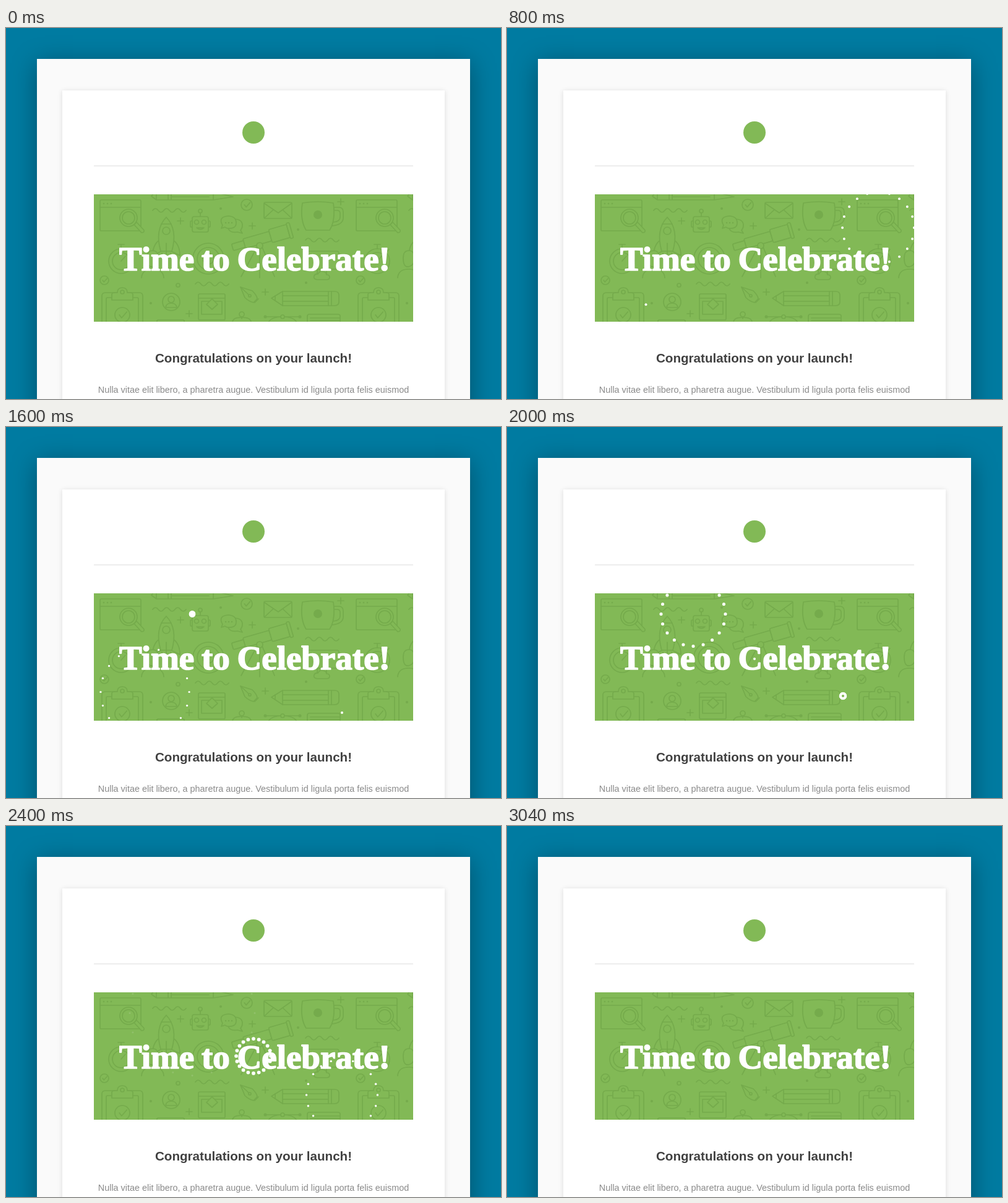
Recreate the animation shown at these times as an HTML page with a canvas. Size 800x600 px, loop 3.52 s.

```html
<!DOCTYPE html>
<html lang="en">
<head>
<meta charset="utf-8">
<title>Celebrate</title>
<style>
html, body { margin: 0; width: 100%; height: 100%; overflow: hidden; background: #007ba1; }
canvas { display: block; }
</style>
</head>
<body>
<canvas id="stage" width="800" height="600"></canvas>
<script>
const GREEN = '#82b956', INK = '#75ab4c';
const LOOP = 3520, STEP = 80;
const BURST = 980, REACH = 103, LIFT = 46, SPARKS = 20;
const TILE = 414;

const stage = document.getElementById('stage').getContext('2d');
const page = document.createElement('canvas');
page.width = 800;
page.height = 600;
const g = page.getContext('2d');

// launch = start of the climb, pop = start of the burst
const rockets = [
  { x: 600, y: 323, launch: 75, pop: 271, size: 2.4 },
  { x: 224.5, y: 428.5, launch: 660, pop: 985, size: 2.1 },
  { x: 301, y: 302.5, launch: 1199, pop: 1507, size: 3 },
  { x: 543, y: 435, launch: 1492, pop: 1874, size: 2.1 },
  { x: 400, y: 372, launch: 1740, pop: 2058, size: 3.1 }
];

function disc(c, x, y, r) {
  c.beginPath();
  c.arc(x, y, r, 0, Math.PI * 2);
  c.fill();
}

function panel(x, y, w, fill, blur, shade, drop) {
  g.save();
  g.shadowColor = shade;
  g.shadowBlur = blur;
  g.shadowOffsetY = drop;
  g.fillStyle = fill;
  g.fillRect(x, y, w, 700);
  g.restore();
}

function shape(d) {
  const p = new Path2D(d);
  g.fillStyle = GREEN;
  g.fill(p);
  g.stroke(p);
}

function ring(x, y, r) {
  g.beginPath();
  g.arc(x, y, r, 0, Math.PI * 2);
  g.fillStyle = GREEN;
  g.fill();
  g.stroke();
}

function box(x, y, w, h, r = 2) {
  g.beginPath();
  g.roundRect(x, y, w, h, r);
  g.fillStyle = GREEN;
  g.fill();
  g.stroke();
}

function dot(x, y, r = 2) {
  g.fillStyle = INK;
  disc(g, x, y, r);
}

function plus(x, y) {
  shape(`M${x - 5} ${y}h10M${x} ${y - 5}v10`);
}

function wave(x, y) {
  shape(`M${x} ${y}q4.5 -6 9 0t9 0t9 0t9 0t9 0t9 0`);
}

function tick(x, y, r) {
  ring(x, y, r);
  const k = r / 10;
  shape(`M${x - 4 * k} ${y}l${3 * k} ${4 * k}l${7 * k} ${-8 * k}`);
}

function browser() {
  box(152, 278, 66, 50);
  shape('M152 290H218');
  [158, 164, 170].forEach(x => dot(x, 284, 1.3));
  shape('M207 318l4 -4l12 13q1 4 -4 4z');
  ring(198, 307, 14);
  ring(198, 307, 10);
}

function spaceship() {
  shape('M249 342q-12 8 -12 26l14 -7M269 342q12 8 12 26l-14 -7');
  shape('M250 361Q240 326 259 306Q278 326 268 361Z');
  shape('M251 317h16M259 348v20M252 364v8M266 364v8');
  ring(259, 328, 6);
}

function robot() {
  shape('M314 299v6');
  ring(314, 296, 3);
  box(298, 312, 4, 10);
  box(326, 312, 4, 10);
  box(301, 305, 26, 25, 3);
  ring(308, 314, 3.5);
  ring(320, 314, 3.5);
  shape('M308 323q6 5 12 0z');
}

function chat() {
  shape('M368 309q14 0 14 10q0 5 -3 8l3 5l-8 -2q-12 2 -15 -6');
  shape('M348 324l2 -5q-8 -14 10 -15q12 1 12 11t-13 9q-3 0 -5 -2z');
  [355, 360, 365].forEach(x => dot(x, 315, 1.2));
}

function envelope() {
  box(417, 282, 45, 26);
  shape('M418 284l22 15l21 -15M418 307l14 -13M461 307l-14 -13');
}

function mug() {
  shape('M529 290h9q7 0 7 8v9q0 11 -18 13');
  shape('M530 295h5q5 0 5 5v6q0 7 -11 8');
  shape('M479 283q25 -4 50 0q4 28 -6 44h-38q-10 -16 -6 -44z');
  dot(504, 302, 7);
}

function telescope() {
  shape('M407 352L380 402M413 352L434 402M410 352V404');
  g.save();
  g.translate(412, 341);
  g.rotate(-0.28);
  box(-48, -5, 22, 11);
  box(-28, -8, 44, 16);
  box(16, -11, 30, 22);
  box(46, -13, 5, 26);
  g.restore();
  ring(410, 352, 5);
}

function dials() {
  ring(186, 377, 20);
  ring(186, 377, 14);
  shape('M186 357v-6M181 350h10M186 377l7 -8M201 362l4 -4');
  ring(327, 373, 25);
  ring(327, 373, 18);
  ring(327, 373, 9);
  shape('M219 404q1 -14 18 -14t18 14M228 372q0 -12 9 -12t9 12t-9 14t-9 -14');
}

function screen() {
  box(484, 361, 54, 29, 3);
  shape('M503 390v7M518 390v7');
  shape('M503 407q-7 -1 -5 -6q1 -4 6 -3q3 -6 9 -4q5 1 5 5q5 0 5 4t-5 4z');
}

function clipboard() {
  box(155, 428, 66, 60, 5);
  box(162, 436, 52, 60);
  shape('M171 440v-9q0 -3 5 -3h4q0 -8 8 -8t8 8h4q5 0 5 3v9z');
  ring(188, 427, 3);
  tick(188, 464, 12);
}

function badge() {
  ring(267, 443, 14);
  shape('M258 452q1 -7 9 -7t9 7z');
  ring(267, 439, 5);
}

function folder() {
  box(311, 430, 43, 42);
  shape('M311 437h43M316 463h33v-21h-33z');
  shape('M333 438l9 9l-9 8l-9 -8z');
}

function nib() {
  shape('M379 419l19 6q8 8 8 13l-6 6q-8 -2 -14 -8z');
  shape('M379 419l15 14M402 444l6 -6');
  ring(394, 433, 2);
}

function pencil() {
  shape('M429 437l18 -11h84q7 0 7 6v11q0 6 -7 6h-84z');
  shape('M447 426v23M447 433h74M447 442h74M521 426v23M526 426v23M435 433v8');
}

function edges() {
  shape('M238 268l-3 4l8 6h92l32 -5l-32 -8M243 269v8M262 269v8M267 269v8M268 273h60M335 268v10');
  shape('M419 467H474M424 476q5 -9 23 -9t23 9');
  ring(447, 467, 3);
  dot(419, 467, 2.5);
  dot(475, 467, 2.5);
  box(487, 463, 53, 18, 3);
  shape('M492 469h47M492 473h47');
  shape('M366 476q0 -8 15 -8t15 8M381 464v6');
  ring(381, 463, 4);
  box(244, 472, 44, 12);
}

function pattern() {
  browser();
  spaceship();
  robot();
  chat();
  envelope();
  mug();
  telescope();
  dials();
  screen();
  clipboard();
  badge();
  folder();
  nib();
  pencil();
  edges();
  wave(237, 295);
  wave(306, 414);
  wave(484, 343);
  tick(389, 286, 9);
  tick(159, 408, 7);
  plus(282, 312);
  plus(541, 281);
  plus(398, 320);
  plus(419, 427);
  plus(296, 462);
  dot(347, 292);
  dot(234, 445);
  dot(472, 326);
  dot(485, 412);
  ring(278, 416, 3);
}

function label(text, x, y, font, color, align) {
  g.font = font;
  g.fillStyle = color;
  g.textAlign = align;
  g.fillText(text, x, y);
}

function paintPage() {
  g.fillStyle = '#007ba1';
  g.fillRect(0, 0, 800, 600);
  panel(50, 50, 700, '#fafafa', 38, 'rgba(0,0,0,.34)', 7);
  panel(91, 101, 618, '#fff', 8, 'rgba(0,0,0,.12)', 1);

  g.fillStyle = GREEN;
  disc(g, 400, 169, 18);
  g.fillStyle = '#dcdcdc';
  g.fillRect(142, 222.5, 516, 1);

  g.save();
  g.beginPath();
  g.rect(142, 269, 516, 206);
  g.clip();
  g.fillStyle = GREEN;
  g.fillRect(142, 269, 516, 206);
  g.strokeStyle = INK;
  g.lineWidth = 1.7;
  g.lineCap = g.lineJoin = 'round';
  pattern();
  g.translate(TILE, 0);
  pattern();
  g.restore();

  const title = 'Time to Celebrate!';
  g.wordSpacing = '-2px';
  label(title, 183, 391.5, 'bold 55px "Liberation Serif", serif', '#fff', 'left');
  g.strokeStyle = '#fff';
  g.lineWidth = 1.7;
  g.lineJoin = 'round';
  g.strokeText(title, 183, 391.5);
  g.wordSpacing = '0px';

  const sans = '"Liberation Sans", Arial, sans-serif';
  label('Congratulations on your launch!', 400, 540.5, 'bold 20.6px ' + sans, '#414141', 'center');
  label('Nulla vitae elit libero, a pharetra augue. Vestibulum id ligula porta felis euismod',
    400, 590, '14.4px ' + sans, '#8a8a8a', 'center');
}

function firework(f, t) {
  if (t < f.launch || t >= f.pop + BURST) return;
  if (t < f.pop) {
    const left = (f.pop - t) / (f.pop - f.launch);
    disc(stage, f.x, f.y + LIFT * left ** 1.6, 2);
    return;
  }
  const p = (t - f.pop) / BURST;
  const r = REACH * (1 - Math.cos(Math.PI * p)) / 2;
  const size = f.size * (1 - 0.6 * p * p);
  stage.globalAlpha = Math.min(1, (1 - p) / 0.3) ** 1.7;
  for (let i = 0; i < SPARKS; i++) {
    const a = i / SPARKS * Math.PI * 2;
    disc(stage, f.x + r * Math.cos(a), f.y + r * Math.sin(a), size);
  }
  stage.globalAlpha = 1;
}

function draw(now) {
  const t = Math.floor((now - start) % LOOP / STEP) * STEP;
  stage.drawImage(page, 0, 0);
  stage.save();
  stage.beginPath();
  stage.rect(142, 269, 516, 206);
  stage.clip();
  stage.fillStyle = '#fff';
  rockets.forEach(f => firework(f, t));
  stage.restore();
}

function loop() {
  draw(performance.now());
  requestAnimationFrame(loop);
}

paintPage();
const start = performance.now();
loop();
</script>
</body>
</html>
```
